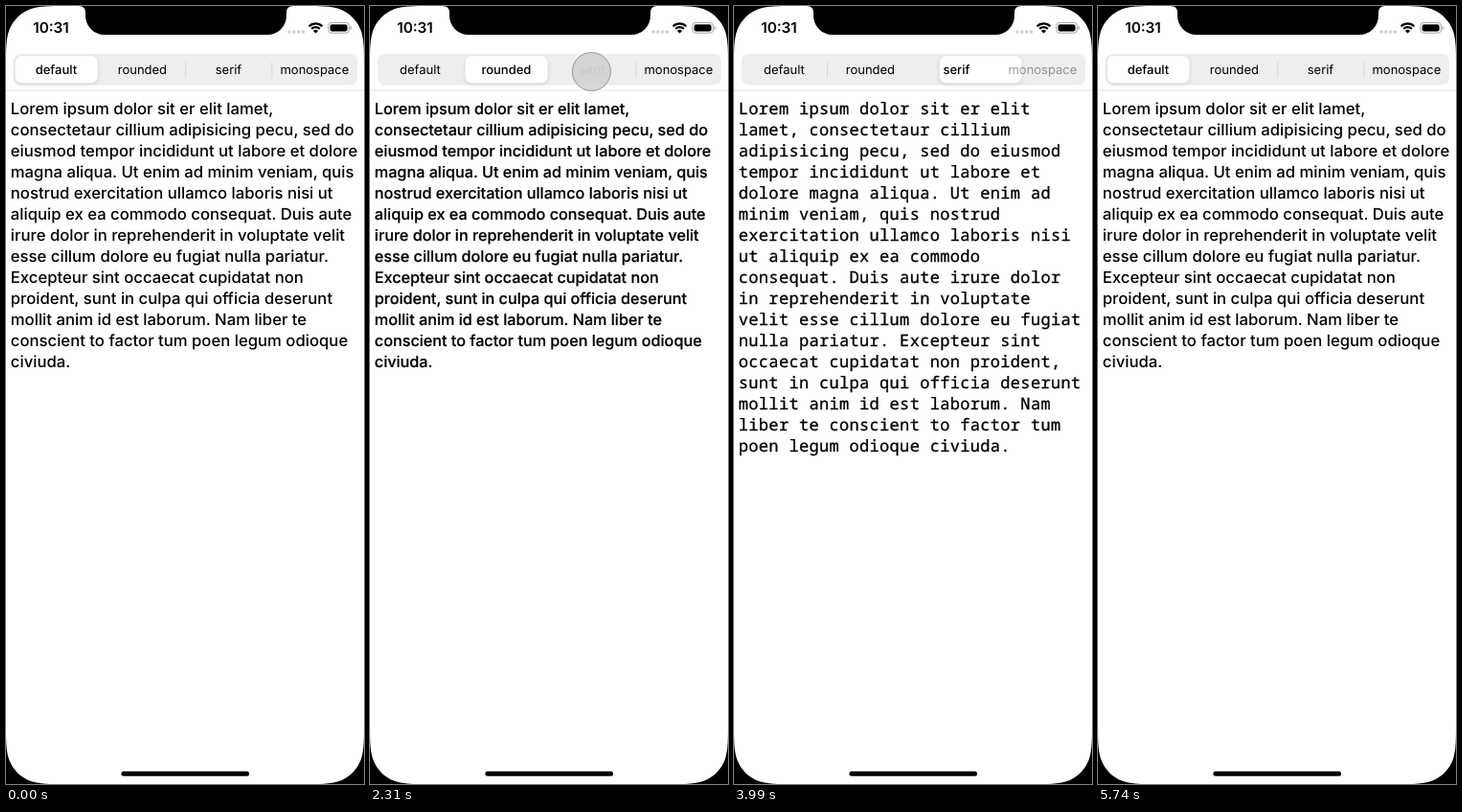
These frames come from a looping animation (374 by 812 pixels, 5810 ms). An HTML page with a canvas:

```html
<!DOCTYPE html>
<html lang="en">
<head>
<meta charset="utf-8">
<title>Font design picker</title>
<style>
  html, body { margin: 0; width: 100%; height: 100%; overflow: hidden; background: #000; }
  canvas { display: block; width: 374px; height: 812px; }
</style>
</head>
<body>
<canvas id="stage"></canvas>
<script>
const W = 374, H = 812, LOOP = 5810;
const canvas = document.getElementById('stage');
const ctx = canvas.getContext('2d');
const ratio = window.devicePixelRatio || 1;
canvas.width = W * ratio;
canvas.height = H * ratio;
ctx.textRendering = 'geometricPrecision';

const SANS = 'Inter, "Liberation Sans", sans-serif';
const LABELS = ['default', 'rounded', 'serif', 'monospace'];
const WORDS = ('Lorem ipsum dolor sit er elit lamet, consectetaur cillium adipisicing pecu, ' +
  'sed do eiusmod tempor incididunt ut labore et dolore magna aliqua. Ut enim ad minim ' +
  'veniam, quis nostrud exercitation ullamco laboris nisi ut aliquip ex ea commodo ' +
  'consequat. Duis aute irure dolor in reprehenderit in voluptate velit esse cillum ' +
  'dolore eu fugiat nulla pariatur. Excepteur sint occaecat cupidatat non proident, sunt ' +
  'in culpa qui officia deserunt mollit anim id est laborum. Nam liber te conscient to ' +
  'factor tum poen legum odioque civiuda.').split(' ');

// "breaks" holds the number of words on each line
const STYLES = [
  { font: '500 16.7px ' + SANS, track: 0, stroke: 0, breaks: '7678677757871' },
  { font: '500 16.2px ' + SANS, track: 0, stroke: 0.2, breaks: '7678677757871' },
  { font: '400 16.8px "Noto Serif", serif', track: 0.35, stroke: 0.3, breaks: '7577576666876' },
  { font: '500 17px "Noto Sans Mono", monospace', track: 0.32, stroke: 0.3, breaks: '63556445546446664' }
];
for (const style of STYLES) {
  let at = 0;
  style.lines = [...style.breaks].map(n => WORDS.slice(at, at += +n).join(' '));
}

// Each tap: touch down, lift, then the pill slides to its new place
const TAPS = [
  { to: 1, at: 860 },
  { to: 2, at: 2400 },
  { to: 3, at: 3890 },
  { to: 0, at: 5440 }
];
const PRESS = 320, LIFT = 60, SLIDE = 290;

const clamp = v => Math.min(1, Math.max(0, v));
const ease = v => v * v * (3 - 2 * v);
const segmentX = i => 52.4 + 90 * i;

function roundRect(x, y, w, h, r, fill) {
  ctx.beginPath();
  ctx.roundRect(x, y, w, h, r);
  ctx.fillStyle = fill;
  ctx.fill();
}

function circle(x, y, r, fill) {
  ctx.beginPath();
  ctx.arc(x, y, r, 0, Math.PI * 2);
  ctx.fillStyle = fill;
  ctx.fill();
}

function stateAt(t) {
  const s = { selected: 0, pill: 0, pressed: -1, dim: 0, touch: 0 };
  for (const { to, at } of TAPS) {
    const dt = t - at;
    if (dt < -PRESS) break;
    if (dt < SLIDE) {
      s.pressed = to;
      s.dim = clamp((dt + PRESS) / 90) * (1 - clamp((dt - 100) / 180));
    }
    if (dt < -LIFT) s.touch = clamp((dt + PRESS) / 60);
    if (dt >= 0) {
      s.pill += (to - s.pill) * ease(clamp(dt / SLIDE));
      s.selected = to;
    }
  }
  return s;
}

function drawStatus() {
  ctx.fillStyle = '#000';
  ctx.font = '600 15.3px ' + SANS;
  ctx.textAlign = 'center';
  ctx.fillText('10:31', 47, 28.3);

  for (let i = 0; i < 4; i++) circle(296 + i * 4.8, 27, 1.8, '#cfcfcf');

  ctx.strokeStyle = ctx.fillStyle = '#000';
  ctx.lineWidth = 2.2;
  const from = -Math.PI * 0.75, to = -Math.PI * 0.25;
  for (const r of [9.8, 6.1]) {
    ctx.beginPath();
    ctx.arc(323.5, 28.2, r, from, to);
    ctx.stroke();
  }
  ctx.beginPath();
  ctx.moveTo(323.5, 28.6);
  ctx.arc(323.5, 28.6, 3.7, from, to);
  ctx.fill();

  ctx.beginPath();
  ctx.roundRect(336.8, 17.4, 21.6, 10.8, 3.2);
  ctx.strokeStyle = '#a6a6a6';
  ctx.lineWidth = 1;
  ctx.stroke();
  roundRect(338.6, 19.2, 18, 7.2, 1.8, '#000');
  roundRect(359.4, 21, 1.3, 3.8, [0, 1.3, 1.3, 0], '#a6a6a6');
}

function drawPicker(s) {
  roundRect(8, 50, 359, 32.5, 8, '#eeedef');

  for (let i = 0; i < 3; i++) {
    ctx.globalAlpha = clamp((Math.abs(s.pill - i - 0.5) - 0.8) * 5);
    ctx.fillStyle = '#d8d8dc';
    ctx.fillRect(97 + i * 90.2, 58, 1, 17);
  }
  ctx.globalAlpha = 1;

  ctx.save();
  ctx.shadowColor = 'rgba(0,0,0,0.12)';
  ctx.shadowBlur = 5 * ratio;
  ctx.shadowOffsetY = 1.5 * ratio;
  roundRect(9.6 + 90 * s.pill, 52, 86, 28.6, 7, '#fff');
  ctx.restore();

  ctx.textAlign = 'center';
  LABELS.forEach((label, i) => {
    ctx.font = (i === Math.round(s.pill) ? 500 : 400) + ' 13px ' + SANS;
    ctx.globalAlpha = i === s.pressed ? 1 - 0.62 * s.dim : 1;
    ctx.fillStyle = '#000';
    ctx.fillText(label, segmentX(i), 70.8);
  });
  ctx.globalAlpha = 1;

  ctx.fillStyle = '#e3e3e3';
  ctx.fillRect(0, 87.5, W, 1);
}

function drawBody({ font, track, stroke, lines }) {
  ctx.font = font;
  ctx.textAlign = 'left';
  ctx.letterSpacing = track + 'px';
  ctx.fillStyle = ctx.strokeStyle = '#000';
  ctx.lineWidth = stroke;
  ctx.lineJoin = 'round';
  lines.forEach((line, i) => {
    const y = 112.8 + i * 22;
    ctx.fillText(line, 4.8, y);
    if (stroke) ctx.strokeText(line, 4.8, y);
  });
  ctx.letterSpacing = '0px';
}

function drawTouch(s) {
  if (!s.touch) return;
  ctx.globalAlpha = s.touch;
  circle(segmentX(s.pressed) - 1, 68.5, 20, 'rgba(208,208,208,0.85)');
  ctx.strokeStyle = '#999';
  ctx.lineWidth = 1;
  ctx.stroke();
  ctx.globalAlpha = 1;
}

function drawNotch() {
  ctx.beginPath();
  ctx.moveTo(76, 0);
  ctx.quadraticCurveTo(83, 0, 83, 7);
  ctx.lineTo(83, 10);
  ctx.arcTo(83, 30, 103, 30, 20);
  ctx.lineTo(273, 30);
  ctx.arcTo(293, 30, 293, 10, 20);
  ctx.lineTo(293, 7);
  ctx.quadraticCurveTo(293, 0, 300, 0);
  ctx.fillStyle = '#000';
  ctx.fill();
}

// Black screen corners with a continuous curve, mirrored into all four places
function drawCorners(r) {
  ctx.fillStyle = '#000';
  for (const [x, y] of [[0, 0], [1, 0], [0, 1], [1, 1]]) {
    ctx.save();
    ctx.translate(x * W, y * H);
    ctx.scale(x ? -r : r, y ? -r : r);
    ctx.beginPath();
    ctx.moveTo(0, 0);
    ctx.lineTo(1.529, 0);
    ctx.bezierCurveTo(1.088, 0, 0.868, 0, 0.631, 0.075);
    ctx.bezierCurveTo(0.373, 0.169, 0.169, 0.373, 0.075, 0.631);
    ctx.bezierCurveTo(0, 0.868, 0, 1.088, 0, 1.529);
    ctx.fill();
    ctx.restore();
  }
}

function draw(t) {
  const s = stateAt(t);
  ctx.setTransform(ratio, 0, 0, ratio, 0, 0);
  ctx.fillStyle = '#fff';
  ctx.fillRect(0, 0, W, H);
  drawStatus();
  drawPicker(s);
  drawBody(STYLES[s.selected]);
  drawTouch(s);
  drawNotch();
  drawCorners(41);
  roundRect(120.4, 798.8, 133.6, 5, 2.5, '#000');
}

const start = performance.now();
function tick() {
  draw((performance.now() - start) % LOOP);
  requestAnimationFrame(tick);
}
tick();
</script>
</body>
</html>
```
